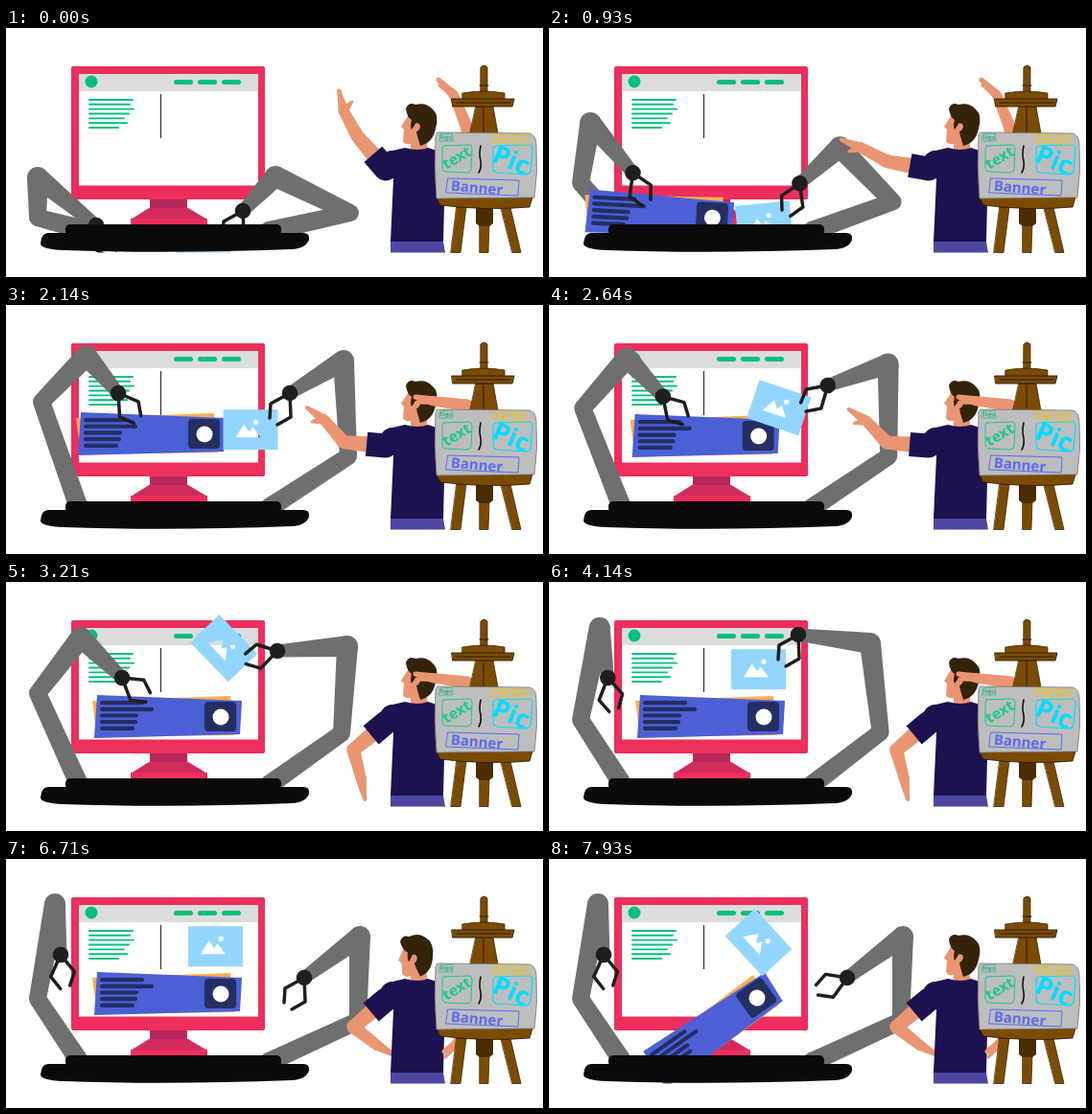
Animation, 560 px wide and 260 px high, one loop 8000 ms. Source, as an HTML page with a canvas:

```html
<!DOCTYPE html>
<html lang="en">
<head>
<meta charset="utf-8">
<title>Robot arms build a web page</title>
<style>
html, body { margin: 0; width: 100%; height: 100%; overflow: hidden; background: #fff; }
canvas { display: block; width: 560px; height: 260px; }
</style>
</head>
<body>
<canvas id="stage" width="560" height="260"></canvas>
<script>
const ctx = document.getElementById('stage').getContext('2d');
const LOOP = 8000, RAD = Math.PI / 180;
const PINK = '#ec2f5c', GREEN = '#00c07f', GREY = '#6f6f6f', CLAW = '#1e1e1e', BLUE = '#4c5fd5',
  NAVY = '#232e63', ORANGE = '#ffae4d', SKY = '#92d6ff', SKIN = '#e99572', SHIRT = '#1d1150',
  HAIR = '#33230a', BROWN = '#7b4b00', DARK = '#2b1a00';

// Robot arm poses: lower elbow, upper elbow, wrist, claw angle
const LEFT = {
  rest: [33, 198, 33, 156, 94, 206, 0],
  lift: [33, 120, 55, 33, 80, 88, 12],
  carry: [37, 101, 84, 53, 117, 92, -6],
  place: [33, 116, 78, 58, 121, 100, -23],
  idle: [33, 146, 51, 47, 57, 100, 22]
};
const RIGHT = {
  rest: [359, 193, 281, 155, 247, 191, 0],
  lift: [358, 168, 329, 89, 278, 129, -12],
  carry: [357, 158, 352, 58, 296, 92, 0],
  turn: [350, 158, 356, 67, 283, 72, 46],
  place: [346, 157, 335, 64, 259.5, 53, 0],
  idle: [337, 155, 334, 65, 271, 102, 0],
  point: [367, 169, 369, 81, 311, 124, 0],
  wave: [367, 169, 369, 81, 311, 124, 38]
};
// Painter: angles of upper arm, forearm, hand, and of the thumb against the hand
const NEAR = {
  raised: [229, 241, 257, 55],
  point: [190, 208, 202, -40],
  beckon: [185, 229, 215, -45],
  hang: [140, 75, 80, 10],
  hip: [140, 38, 30, 0]
};
// Painter: wrist and fingertip of the arm behind the board
const FAR = {
  raised: [467, 70, 451, 54],
  head: [444, 100, 427, 96],
  hidden: [474, 160, 468, 165],
  hip: [470, 193, 457, 201]
};

function ease(t, start, end) {
  const u = Math.min(1, Math.max(0, (t - start) / (end - start)));
  return u * u * (3 - 2 * u);
}
const mix = (a, b, u) => a.map((v, i) => v + (b[i] - v) * u);
// Runs through moves of [start, end, pose], beginning at the first pose
const follow = (first, moves, t) =>
  moves.reduce((pose, [start, end, next]) => mix(pose, next, ease(t, start, end)), first);

const leftArm = t => follow(LEFT.rest, [[350, 1570, LEFT.lift], [1600, 2140, LEFT.carry],
  [2200, 3150, LEFT.place], [3400, 4280, LEFT.idle]], t);
const rightArm = t => follow(RIGHT.rest, [[350, 1570, RIGHT.lift], [1600, 2140, RIGHT.carry],
  [2250, 3150, RIGHT.turn], [3450, 4020, RIGHT.place], [4050, 4800, RIGHT.idle],
  [5600, 6650, RIGHT.point], [7100, 7850, RIGHT.wave]], t);
const nearArm = t => follow(NEAR.raised, [[70, 900, NEAR.point], [1650, 2140, NEAR.beckon],
  [2600, 3200, NEAR.hang], [4360, 5100, NEAR.hip]], t);
const farArm = t => follow(FAR.raised, [[1500, 2140, FAR.head], [4360, 5100, FAR.hidden],
  [5300, 5950, FAR.hip]], t);

// Both cards start below the base, ride with a claw until released, and drop at the end
const sink = t => 24 * (1 - ease(t, 300, 950));
const drop = t => (Math.max(0, t - 7640) / 290) ** 2;
function bannerPlace(t) {
  const arm = leftArm(Math.min(t, 3200)), slide = ease(t, 1570, 3000), fall = drop(t);
  return [arm[4] + 28 + 20 * slide + 3 * fall, arm[5] + 44 - 3 * slide + sink(t) + 35.5 * fall,
    3 - 3 * ease(t, 1570, 2140) - 35 * fall];
}
function picturePlace(t) {
  const arm = rightArm(Math.min(t, 4030)), grip = (arm[6] + 137) * RAD, fall = drop(t);
  return [arm[4] + 56 * Math.cos(grip), arm[5] + 56 * Math.sin(grip) + sink(t) - 4 * fall,
    arm[6] + 47 * fall];
}

function shape(d, fill, stroke, width = 1) {
  const path = new Path2D(d);
  if (fill) { ctx.fillStyle = fill; ctx.fill(path, 'evenodd'); }
  if (stroke) { ctx.strokeStyle = stroke; ctx.lineWidth = width; ctx.stroke(path); }
}
function rect(x, y, w, h, fill, r = 0) {
  ctx.fillStyle = fill;
  ctx.beginPath();
  ctx.roundRect(x, y, w, h, r);
  ctx.fill();
}
function dot(x, y, r, fill) {
  ctx.fillStyle = fill;
  ctx.beginPath();
  ctx.arc(x, y, r, 0, 7);
  ctx.fill();
}
function at(x, y, degrees, draw) {
  ctx.save();
  ctx.translate(x, y);
  ctx.rotate(degrees * RAD);
  draw();
  ctx.restore();
}
const polar = ([x, y], length, degrees) =>
  [x + length * Math.cos(degrees * RAD), y + length * Math.sin(degrees * RAD)];

// Tapered segments with round joints
function limb(color, points, widths) {
  points.forEach(([x, y], i) => {
    dot(x, y, widths[i] / 2, color);
    if (!i) return;
    const [px, py] = points[i - 1], len = Math.hypot(x - px, y - py) || 1;
    const nx = (py - y) / len / 2, ny = (x - px) / len / 2, a = widths[i - 1], b = widths[i];
    ctx.beginPath();
    ctx.moveTo(px + nx * a, py + ny * a);
    ctx.lineTo(x + nx * b, y + ny * b);
    ctx.lineTo(x - nx * b, y - ny * b);
    ctx.lineTo(px - nx * a, py - ny * a);
    ctx.fill();
  });
}
function label(text, x, y, size, angle, color, weight = 600) {
  at(x, y, angle, () => {
    ctx.font = `${weight} ${size}px "Open Sans", "Noto Sans", sans-serif`;
    ctx.textAlign = 'center';
    ctx.fillStyle = color;
    ctx.fillText(text, 0, size * .34);
  });
}

function monitor() {
  rect(150, 177, 39, 12, '#b8275a');
  shape('M149 188H190L210 200H130Z', '#d02b5b');
  rect(130, 199, 80, 7, PINK);
  rect(68, 40, 202, 139, PINK, 2);
  rect(76, 48, 187, 116.5, '#fff');
  rect(76, 48, 187, 18, '#dcdcdc');
  dot(89, 56, 6.5, GREEN);
  for (const x of [175, 200, 225]) rect(x, 54, 20, 5, GREEN, 2.5);
  [47, 44, 48, 43, 38, 41, 32].forEach((w, i) => rect(86, 74 + i * 4.85, w, 1.9, GREEN, 1));
  rect(161, 69, 1, 46, '#222');
}

function banner() {
  shape('M-79-17L65-22L69 19L-74 21Z', ORANGE);
  shape('M-74-23L77-17L75 18L-77 22Z', BLUE);
  [46, 56, 40, 39, 36].forEach((w, i) => rect(-71, -17 + i * 6.7, w, 4.2, NAVY, 2));
  rect(38, -16, 33, 31, NAVY, 4);
  dot(55, 0, 8.5, '#fff');
}

// The hills and sun are holes, so what lies behind shows through
function picture() {
  shape('M-28.5-21H28.5V21H-28.5ZM-15.5 8L-7-6L-1.5 2L2-3L10.5 8Z' +
    'M2.9-8a2.6 2.6 0 1 0 5.2 0a2.6 2.6 0 1 0-5.2 0', SKY);
}

function claw(x, y, angle, mirror) {
  at(x, y, angle, () => {
    ctx.scale(mirror, 1);
    shape('M0 0L-20 11L-21 26M0 0L1 25L-13 33', null, CLAW, 3.5);
    dot(0, 0, 8.3, CLAW);
  });
}

function robotArm(base, [lowerX, lowerY, upperX, upperY, wristX, wristY]) {
  limb(GREY, [base, [lowerX, lowerY], [upperX, upperY], [wristX, wristY]], [20, 18, 22, 13]);
}

function robot(t) {
  const left = leftArm(t), right = rightArm(t);
  ctx.save();
  ctx.beginPath();
  ctx.rect(0, 0, 560, 234.5);
  ctx.clip();
  robotArm([75, 209], left);
  robotArm([274, 212], right);
  at(...bannerPlace(t), banner);
  at(...picturePlace(t), picture);
  claw(...left.slice(4), -1);
  claw(...right.slice(4), 1);
  ctx.restore();
  rect(62, 205, 225, 12, '#0a0a0a', 5);
  shape('M44 214H310Q317 214 316 221Q313 230 298 231Q170 236 60 232Q36 231 36 225Q37 214 44 214Z', '#0a0a0a');
}

function head() {
  shape('M-11-31L-18-20L-15-17L-16-5Q-14-1-8-2L-8 9H9V-12L3-36Z', SKIN);
  shape('M-13-39Q-10-46-3-43Q8-46 15-38Q22-32 18-18Q15-3 2 0L-1-10L-2-15Q2-22-2-24L-7-17' +
    'Q-9-20-7-27Q-12-30-13-39Z', HAIR);
  shape('M-4-22Q1-26 2-20Q1-15-3-15Z', SKIN);
}

function painter(t) {
  const [upper, fore, hand, thumb] = nearArm(t), shoulder = [396, 147];
  const cuff = polar(shoulder, 20, upper), elbow = polar(shoulder, 44, upper);
  const wrist = polar(elbow, 31, fore), tip = polar(wrist, 22, hand);
  limb(SKIN, [shoulder, elbow, wrist, tip], [18, 14, 11, 4]);
  limb(SKIN, [wrist, polar(wrist, 13, hand + thumb)], [10, 3]);

  at(430, 123, -9 * (ease(t, 6070, 6600) - ease(t, 7000, 7600)), head);
  shape('M401 223H456L458 234.5H401Z', '#4d47a0');
  shape('M399 129L416 125Q430 129 440 125L449 128V176L457 184L456 223H401L404 158Z', SHIRT);
  ctx.lineCap = 'butt';
  shape(`M404 142L${shoulder}L${cuff}`, null, SHIRT, 25);
  ctx.lineCap = 'round';
  dot(403, 141, 13, SHIRT);

  const [wristX, wristY, tipX, tipY] = farArm(t), farWrist = [wristX, wristY];
  limb(SKIN, [[482, 132], [481, Math.max(105, wristY - 17)], farWrist, [tipX, tipY]], [13, 13, 10, 5]);
  limb(SKIN, [farWrist, [tipX + 1, tipY + 6]], [8, 3]);
}

function easel() {
  shape('M470 187H480L474 234.5H464ZM516 187H526L537 234.5H528ZM494 204H504L503 234.5H494Z', BROWN, DARK, .7);
  shape('M490 187H508V204L504 207H494L490 204Z', '#4a2d00');
  shape('M490 82H508L513 110H484ZM495 41Q498.5 37 502 41V67H495Z', BROWN, DARK, .7);
  shape('M476 68Q498 64 520 68V75H476Z', BROWN, DARK, .7);
  shape('M465 74H530L528 82H466Z', BROWN, DARK, .9);
  shape('M494 60H503M470 78H526M498 84V108', null, DARK);
  shape('M449 177H549L546 187Q500 191 453 185Z', BROWN, DARK, .8);
  shape('M450 109L546 110Q553 112 553 122Q555 150 551 177L449 178Q446 145 448 112Z', '#bdbdbd', '#777', .8);

  shape('M457 123L483 122Q486 122 486 126L485 148Q484 151 480 151L458 150Q455 149 455 146L455 126Q455 123 457 123Z', null, '#19c98b');
  label('text', 470, 135.5, 15.5, -30, '#19c98b', 700);
  shape('M512 123L545 122Q549 122 549 127L547 149Q546 153 541 153L512 151Q508 150 508 146L508 127Q508 123 512 123Z', null, '#00dcff', 1.2);
  label('Pic', 527, 138, 27, 23, '#00dcff', 700);
  shape('M461 157L535 159L534 175L459 172Z', null, '#5b6cf0');
  label('Banner', 491, 167, 15, 5, '#5b6cf0', 700);
  shape('M453 111L465 110L466 118L452 118Z', null, '#19c98b', .8);
  label('logo', 459, 114, 6, 4, '#19a878');
  shape('M507 111L544 112L545 122L506 119Z', null, '#ecc018', .9);
  label('nav bar', 526, 115.5, 9, 4, '#ecc018');
  shape('M495 123Q493 132 495 139Q496 146 493 151', null, '#111', 1.6);
}

function frame() {
  const t = performance.now() % LOOP;
  ctx.fillStyle = '#fff';
  ctx.fillRect(0, 0, 560, 260);
  ctx.lineJoin = ctx.lineCap = 'round';
  monitor();
  robot(t);
  painter(t);
  easel();
  requestAnimationFrame(frame);
}
requestAnimationFrame(frame);
</script>
</body>
</html>
```
